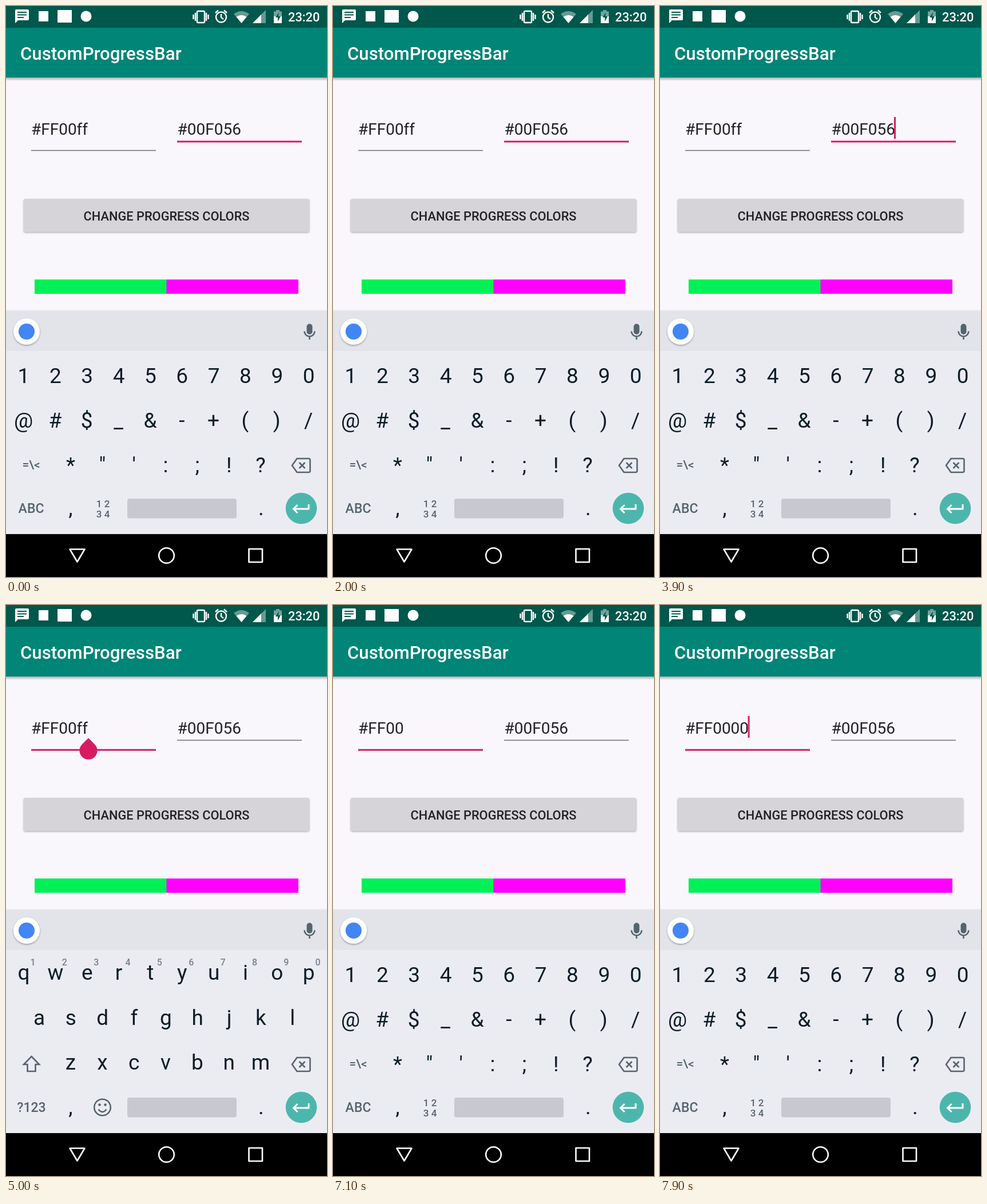
An HTML page for the animation above (8 s loop, 561 by 998 pixels).

```html
<!DOCTYPE html>
<html lang="en">
<head>
<meta charset="utf-8">
<title>CustomProgressBar</title>
<style>
  html, body { margin: 0; width: 100%; height: 100%; overflow: hidden; background: #000; }
  svg { display: block; width: 561px; height: 998px; font-family: Roboto, sans-serif; }
  .mid { text-anchor: middle; }
  .bold { font-weight: 500; }
  .field { font-size: 28px; fill: #212024; }
  .keys { font-size: 37px; fill: #0b1d26; text-anchor: middle; }
  .mode { font-size: 23px; font-weight: 500; fill: #55646d; text-anchor: middle; }
  .hints { font-size: 16px; font-weight: 500; fill: #75828a; text-anchor: middle; }
  .icon { fill: none; stroke: #55646d; stroke-width: 2.6; }
  .accent { fill: #d81b60; }

  /* 1% = 80 ms, every change is a hard cut */
  .anim { animation: 8s step-end infinite; }
  .right { animation-name: right; }
  .left { animation-name: left; }
  .blink-right { animation-name: blink-right; }
  .blink-left { animation-name: blink-left; }
  .caret { animation-name: caret; }
  .handle { animation-name: handle; }
  .letters { animation-name: letters; }
  .symbols { animation-name: symbols; }
  .f1 { animation-name: f1; }
  .f2 { animation-name: f2; }
  .zero1 { animation-name: zero1; }
  .zero2 { animation-name: zero2; }
  .popup { animation-name: popup; }

  @keyframes right { 0% { opacity: 1 } 50%, 100% { opacity: 0 } }
  @keyframes left { 0% { opacity: 0 } 50%, 100% { opacity: 1 } }
  @keyframes blink-right {
    0%, 12.5%, 25%, 37.5%, 50%, 100% { opacity: 0 }
    6.25%, 18.75%, 31.25%, 43.75% { opacity: 1 }
  }
  @keyframes blink-left {
    0%, 57.5%, 76.25%, 88.75% { opacity: 0 }
    51.25%, 63.75%, 82.5%, 93.75%, 100% { opacity: 1 }
  }
  @keyframes caret {
    0% { transform: translateX(143px) }
    65% { transform: translateX(133.3px) }
    70% { transform: translateX(123.6px) }
    93.75% { transform: translateX(139.4px) }
    96.25%, 100% { transform: translateX(155.1px) }
  }
  @keyframes handle { 0%, 65%, 100% { opacity: 0 } 50% { opacity: 1 } }
  @keyframes letters { 0%, 82.5%, 100% { opacity: 0 } 51.25% { opacity: 1 } }
  @keyframes symbols { 0%, 82.5%, 100% { opacity: 1 } 51.25% { opacity: 0 } }
  @keyframes f1 { 0% { opacity: 1 } 70%, 100% { opacity: 0 } }
  @keyframes f2 { 0% { opacity: 1 } 65%, 100% { opacity: 0 } }
  @keyframes zero1 { 0% { opacity: 0 } 93.75%, 100% { opacity: 1 } }
  @keyframes zero2 { 0% { opacity: 0 } 96.25%, 100% { opacity: 1 } }
  @keyframes popup { 0%, 93.75%, 98.75%, 100% { opacity: 0 } 92.5%, 95% { opacity: 1 } }
</style>
</head>
<body>
<svg viewBox="0 0 561 998">
  <defs>
    <linearGradient id="fade" x2="0" y2="1">
      <stop stop-color="#000" stop-opacity=".3"/>
      <stop offset="1" stop-color="#000" stop-opacity="0"/>
    </linearGradient>
    <filter id="shadow" x="-20%" y="-20%" width="140%" height="150%">
      <feDropShadow dx="0" dy="1.5" stdDeviation="1.5" flood-opacity=".35"/>
    </filter>
  </defs>

  <rect width="561" height="998" fill="#faf7fc"/>
  <rect y="125" width="561" height="6" fill="url(#fade)"/>
  <rect y="37" width="561" height="88" fill="#008577"/>
  <rect width="561" height="38" fill="#00574b"/>

  <!-- Status bar -->
  <g fill="#fff">
    <path d="M18 6H38Q40 6 40 8V23Q40 25 38 25H21L16 30V8Q16 6 18 6Z"/>
    <path d="M20 11H36M20 15.5H36M20 20H31" stroke="#00574b" stroke-width="2"/>
    <rect x="57" y="9" width="17" height="18"/>
    <rect x="90" y="7" width="25" height="22"/>
    <circle cx="140" cy="18" r="9.5"/>
    <g fill="none" stroke="#fff" stroke-width="2.4">
      <rect x="334" y="9" width="13" height="20" rx="1.5"/>
      <path d="M331 12V26M327.500 15V23M350 12V26M353.500 15V23"/>
      <circle cx="376" cy="19.500" r="9"/>
      <path d="M376 14V20L380 23M366 12L371 7.500M386 12L381 7.500"/>
    </g>
    <path d="M398 14Q411.500 4 425 14L411.500 30Z" opacity=".4"/>
    <path d="M402.500 19Q411.500 13 420.500 19L411.500 30Z"/>
    <path d="M454 7V30H431Z" opacity=".4"/>
    <path d="M446 15V30H431Z"/>
    <path d="M472 7H478V9.500H482V30H468V9.500H472Z" opacity=".45"/>
    <path d="M468 18H482V30H468Z"/>
    <path d="M477 11L471 20H475V27L480 18H476Z" fill="#00574b"/>
    <text class="bold" x="493" y="27" font-size="21.8">23:20</text>
    <text class="bold" x="25" y="93.500" font-size="31.2">CustomProgressBar</text>
  </g>

  <!-- Colour fields -->
  <g class="field">
    <text x="44" y="224.500">#FF00</text>
    <text class="anim f1" x="123.600" y="224.500">f</text>
    <text class="anim f2" x="133.300" y="224.500">f</text>
    <text class="anim zero1" x="123.600" y="224.500">0</text>
    <text class="anim zero2" x="139.300" y="224.500">0</text>
    <text x="299.500" y="224.500">#00F056</text>
  </g>
  <g class="anim right">
    <rect x="44" y="251.700" width="218" height="1.600" fill="#77757a"/>
    <rect class="accent" x="299" y="235.500" width="218" height="3"/>
  </g>
  <g class="anim left">
    <rect class="accent" x="44" y="251.800" width="218" height="3"/>
    <rect x="299" y="235.600" width="218" height="1.600" fill="#77757a"/>
  </g>
  <rect class="accent anim blink-right" x="409" y="194" width="3" height="38"/>
  <g class="anim blink-left">
    <rect class="accent anim caret" x="-1.500" y="194" width="3" height="38"/>
  </g>
  <g class="anim handle">
    <path class="accent" transform="translate(144 254.500)" d="M0-21.900L10.960-10.960A15.500 15.500 0 1 1-10.960-10.960Z"/>
  </g>

  <rect x="31" y="337" width="499" height="57.500" rx="3" fill="#d6d4d9" filter="url(#shadow)"/>
  <text class="mid bold" x="280.500" y="374.500" font-size="21.8" fill="#212024">CHANGE PROGRESS COLORS</text>
  <rect x="50" y="478" width="231" height="25" fill="#00f056"/>
  <rect x="280.500" y="478" width="230.500" height="25" fill="#f0f"/>

  <!-- Keyboard -->
  <rect y="531" width="561" height="3" fill="#eeecf1"/>
  <rect y="533" width="561" height="71" fill="#e2e4e9"/>
  <rect y="603" width="561" height="320" fill="#ebecf2"/>
  <circle cx="36" cy="569" r="23" fill="#fff" filter="url(#shadow)"/>
  <circle cx="36" cy="569" r="14" fill="#4285f4"/>
  <rect x="525.500" y="555.500" width="10" height="18.500" rx="5" fill="#55646d"/>
  <path class="icon" d="M521.500 568.500A9 9 0 0 0 539.500 568.500M530.500 577.500V583"/>
  <g class="anim symbols">
    <g class="keys" id="symbols"></g>
    <g class="mode">
      <text x="44" y="809" font-size="21">=\&lt;</text>
      <text x="44" y="886">ABC</text>
      <g font-size="17">
        <text style="font-size:17px" x="162.500" y="876">1</text>
        <text style="font-size:17px" x="176.500" y="876">2</text>
        <text style="font-size:17px" x="162.500" y="894">3</text>
        <text style="font-size:17px" x="176.500" y="894">4</text>
      </g>
    </g>
  </g>
  <g class="anim letters">
    <g class="keys" id="letters"></g>
    <g class="hints" id="hints"></g>
    <path class="icon" d="M44.500 789L58 803H51.500V815H37.500V803H31Z"/>
    <text class="mode" x="44.500" y="886">?123</text>
    <circle class="icon" cx="168.500" cy="878" r="14.300"/>
    <path class="icon" d="M161.500 881.500Q168.500 890.500 175.500 881.500"/>
    <circle cx="163.500" cy="873.500" r="2.300" fill="#55646d"/>
    <circle cx="173.500" cy="873.500" r="2.300" fill="#55646d"/>
  </g>
  <g class="keys">
    <text x="113" y="890">,</text>
    <text x="446" y="890">.</text>
  </g>
  <path class="icon" d="M508.500 791H529Q531.500 791 531.500 793.500V812.500Q531.500 815 529 815H508.500L500 803ZM512.500 798L522.500 808M522.500 798L512.500 808"/>
  <rect x="212" y="861" width="191" height="34.500" rx="4" fill="#c8c9d0"/>
  <circle cx="516" cy="878" r="27.300" fill="#4db6ac"/>
  <path d="M529 871V879H503M509.500 872L502.500 879L509.500 886" fill="none" stroke="#fff" stroke-width="3"/>
  <g class="anim popup">
    <rect x="502" y="562" width="57" height="119" rx="4" fill="#f3f4f7" filter="url(#shadow)"/>
    <text class="keys" x="530" y="608">0</text>
  </g>

  <!-- Navigation bar -->
  <rect y="923" width="561" height="75"/>
  <g fill="none" stroke="#fff" stroke-width="2.6" stroke-linejoin="round">
    <path d="M111.500 949.500H137.500L124.500 971.500Z"/>
    <circle cx="280.500" cy="960.500" r="13.300"/>
    <rect x="424.500" y="949" width="23.500" height="23"/>
  </g>
</svg>
<script>
  const step = 55.35;

  function addRow(id, chars, x, y) {
    [...chars].forEach((char, i) => {
      const key = document.createElementNS("http://www.w3.org/2000/svg", "text");
      key.setAttribute("x", x + i * step);
      key.setAttribute("y", y);
      key.textContent = char;
      document.getElementById(id).append(key);
    });
  }

  addRow("symbols", "1234567890", 31, 658.5);
  addRow("symbols", "@#$_&-+()/", 30.5, 737);
  addRow("symbols", "*\"':;!?", 113, 815);
  addRow("letters", "qwertyuiop", 31, 655);
  addRow("letters", "asdfghjkl", 58, 733.5);
  addRow("letters", "zxcvbnm", 113, 811.5);
  addRow("hints", "1234567890", 47, 630);
</script>
</body>
</html>
```
